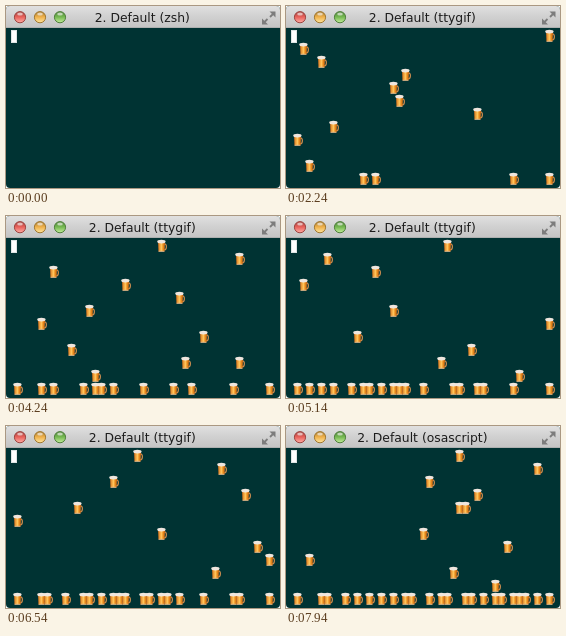
Animation of 274x182 px, one loop 8 s. Source, as an HTML page with a canvas:

```html
<!DOCTYPE html>
<html lang="en">
<head>
<meta charset="utf-8">
<title>Terminal</title>
<style>
html, body { margin: 0; width: 100%; height: 100%; overflow: hidden; background: #fff; }
canvas { display: block; width: 274px; height: 182px; }
</style>
</head>
<body>
<canvas id="stage" width="274" height="182"></canvas>
<script>
const W = 274, H = 182, LOOP = 8000;
const CELL = { w: 6, h: 13, x: 5, y: 24 };
const COLS = 44, ROWS = 12;
const START = 840, STEP = 100;
const ctx = document.getElementById('stage').getContext('2d');

const COMMAND = String.raw`$ ruby -e 'C=%x(stty size).scan(/\d+/)[1].to_i;S=["1f37a".to_i(16)].pack("U*");a={};puts "\033[2J";loop{a[rand(C)]=0;a.each{|x,o|;a[x]+=1;print "\033[#{o};#{x}H \033[#{a[x]};#{x}H#{S} \033[0;0H"};$stdout.flush;sleep 0.1}'`;

// Column in which a new mug starts at each step.
const DROPS = [
  43, 12, 14, 37, 3, 2, 1, 7, 31, 18, 17, 19, 5, 2, 43, 30, 27, 14,
  1, 38, 38, 22, 15, 38, 14, 29, 10, 32, 5, 13, 28, 19, 7, 38, 25, 30,
  11, 43, 17, 14, 2, 14, 6, 26, 9, 37, 23, 34, 34, 43, 41, 25, 0, 11,
  39, 17, 35, 21, 5, 20, 28, 34, 27, 3, 36, 22, 28, 29, 31, 23, 41, 28
];

const TITLES = [
  [0, 'zsh'], [1140, 'sips'], [1940, 'ttygif'],
  [2940, 'screencapture'], [3940, 'ttygif'], [7540, 'osascript']
];

const clamp = (v, lo, hi) => Math.max(lo, Math.min(hi, v));

// Runs the one-liner up to a step and returns the character grid.
function simulate(last) {
  const grid = Array.from({ length: ROWS }, () => Array(COLS + 2).fill(false));
  const put = (row, col, on) => {
    grid[clamp(row, 1, ROWS) - 1][clamp(col, 1, COLS) - 1] = on;
  };
  const fall = new Map();
  for (let i = 0; i <= last; i++) {
    fall.set(DROPS[i], 0);
    for (const [col, row] of fall) {
      put(row, col, false);
      put(row + 1, col, true);
      put(row + 1, Math.max(col, 1) + 1, false);
      fall.set(col, row + 1);
    }
  }
  return grid;
}

function rect(color, x, y, w, h) {
  ctx.fillStyle = color;
  ctx.fillRect(x, y, w, h);
}

function blend(x0, y0, x1, y1, ...colors) {
  const g = ctx.createLinearGradient(x0, y0, x1, y1);
  colors.forEach((c, i) => g.addColorStop(i / (colors.length - 1), c));
  return g;
}

function light(x, rim, mid, pale) {
  ctx.beginPath();
  ctx.arc(x, 11.2, 5.6, 0, 7);
  ctx.fillStyle = blend(0, 5, 0, 17, rim, mid, pale);
  ctx.fill();
  ctx.lineWidth = 1;
  ctx.strokeStyle = rim;
  ctx.stroke();
  ctx.beginPath();
  ctx.ellipse(x, 8, 2.8, 1.5, 0, 0, 7);
  ctx.fillStyle = 'rgba(255,255,255,.6)';
  ctx.fill();
}

function arrow(x, y, dir) {
  ctx.beginPath();
  ctx.moveTo(x, y);
  ctx.lineTo(x - 6 * dir, y);
  ctx.lineTo(x, y + 6 * dir);
  ctx.fill();
  ctx.beginPath();
  ctx.moveTo(x - 2 * dir, y + 2 * dir);
  ctx.lineTo(x - 5.5 * dir, y + 5.5 * dir);
  ctx.stroke();
}

function titleBar(t) {
  rect(blend(0, 0, 0, 22, '#e0e0e0', '#d0d0d0', '#c4c4c4'), 0, 0, W, 22);
  rect('#aeb0b0', 0, 21, W, 1);
  light(14, '#9c4440', '#e8605a', '#ffb0a8');
  light(34, '#a07830', '#efb04a', '#ffe8a0');
  light(54, '#50803c', '#74b850', '#c8f0a0');

  const name = TITLES.filter(([at]) => at <= t).pop()[1];
  const title = `2. Default (${name})`;
  ctx.font = '12.35px "DejaVu Sans", sans-serif';
  ctx.textAlign = 'left';
  ctx.fillStyle = '#1c1c1c';
  // Centred, but never over the window buttons.
  ctx.fillText(title, Math.max(69, 136.3 - ctx.measureText(title).width / 2), 16);

  ctx.fillStyle = ctx.strokeStyle = '#7c7c7c';
  ctx.lineWidth = 1.8;
  arrow(269.5, 5.5, 1);
  arrow(256, 18.5, -1);
}

function mug(col, row) {
  ctx.save();
  ctx.translate(CELL.x + col * CELL.w + 7, CELL.y + row * CELL.h + 6);
  ctx.strokeStyle = '#c98c50';
  ctx.lineWidth = 1.2;
  ctx.beginPath();
  ctx.ellipse(2.4, 0.8, 2, 3, 0, 0, 7);
  ctx.stroke();

  ctx.beginPath();
  ctx.moveTo(-4, -4);
  ctx.lineTo(3, -4);
  ctx.lineTo(2.6, 5.6);
  ctx.lineTo(-3.6, 5.6);
  ctx.fillStyle = blend(-4, 0, 3, 0, '#b4601c', '#f0a03a', '#ffc45a', '#e88a1c', '#c46010');
  ctx.fill();
  rect('#d8b48c', -3.4, 4.8, 5.8, 1);

  ctx.beginPath();
  ctx.ellipse(-0.6, -4.4, 4.2, 1.9, 0, 0, 7);
  ctx.fillStyle = '#efe6de';
  ctx.fill();
  ctx.restore();
}

function cursor(col, row) {
  const x = CELL.x + col * CELL.w, y = CELL.y + row * CELL.h;
  rect('#dfe6e6', x, y, CELL.w, CELL.h);
  rect('#ffffff', x + 1, y + 1, CELL.w - 2, CELL.h - 2);
}

function typed(length) {
  ctx.font = '10px "DejaVu Sans Mono", monospace';
  ctx.textAlign = 'left';
  ctx.fillStyle = '#c3cfcf';
  for (let i = 0; i < length; i += COLS) {
    const line = COMMAND.slice(i, Math.min(i + COLS, length));
    ctx.fillText(line, CELL.x, CELL.y + (2 + i / COLS) * CELL.h + 10);
  }
}

let shown = -1, grid = null;

function terminal(t) {
  if (t < 120) {
    cursor(0, 0);
  } else if (t < 700) {
    typed(80);
    cursor(80 % COLS, 3);
  } else if (t < START) {
    typed(COMMAND.length);
    cursor(0, 7);
  } else {
    const step = Math.min(Math.floor((t - START) / STEP), DROPS.length - 1);
    if (step !== shown) {
      grid = simulate(step);
      shown = step;
    }
    cursor(0, 0);
    grid.forEach((line, row) => line.forEach((on, col) => on && mug(col, row)));
  }
}

function draw(t) {
  ctx.clearRect(0, 0, W, H);
  ctx.save();
  ctx.beginPath();
  ctx.roundRect(0, 0, W, H, 4);
  ctx.clip();
  rect('#003333', 0, 0, W, H);
  titleBar(t);
  terminal(t);
  ctx.restore();
}

const began = performance.now();
function tick() {
  draw((performance.now() - began) % LOOP);
  requestAnimationFrame(tick);
}
tick();
</script>
</body>
</html>
```
